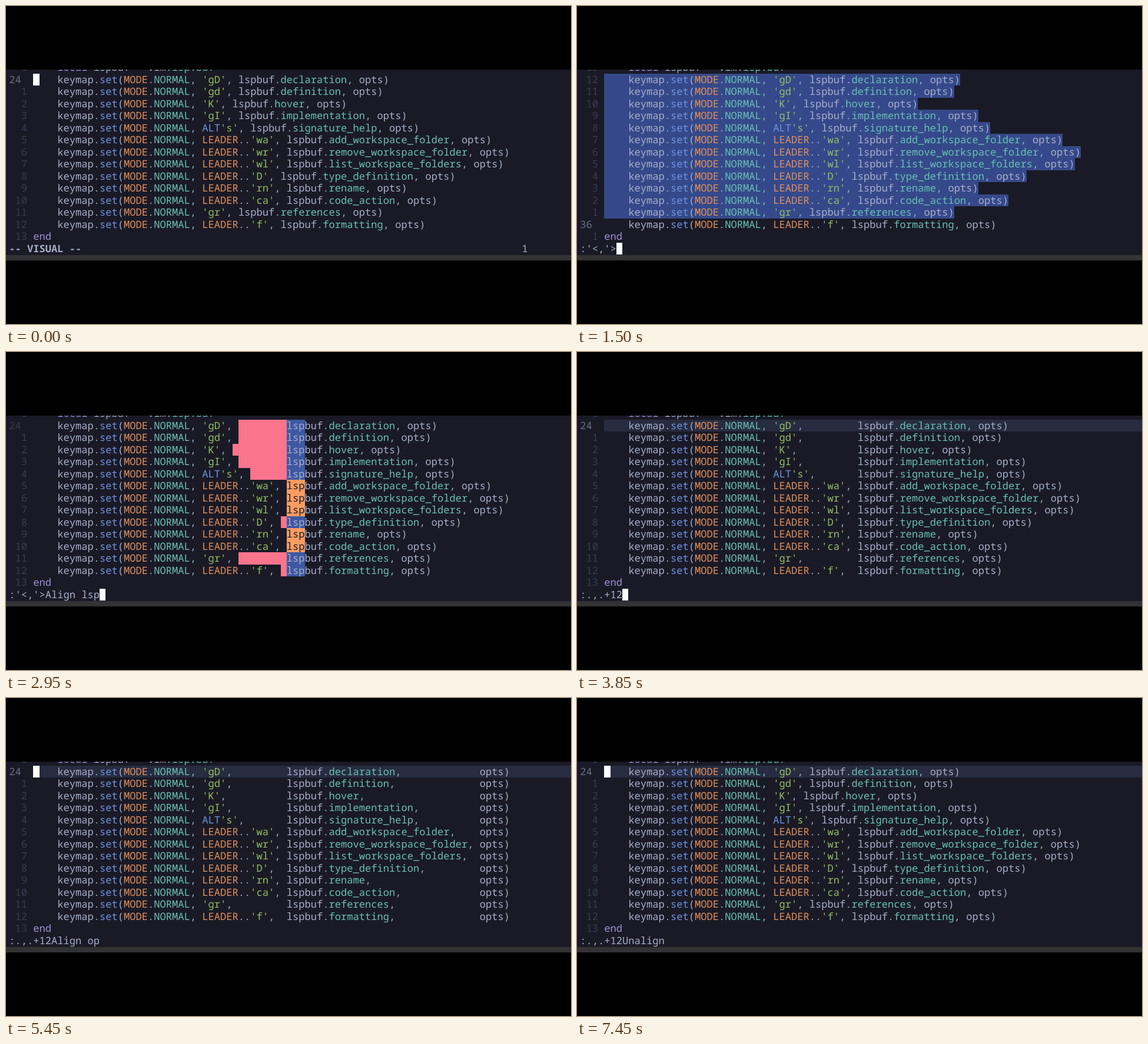
Animation of 960 by 540 pixels, one loop 7500 ms. Source, as an HTML page with a canvas:

```html
<!DOCTYPE html>
<html lang="en">
<head>
<meta charset="utf-8">
<title>Align preview</title>
<style>
  html, body { margin: 0; width: 100%; height: 100%; overflow: hidden; background: #000; }
  canvas { display: block; }
</style>
</head>
<body>
<canvas id="stage" width="960" height="540"></canvas>
<script>
const ctx = document.getElementById('stage').getContext('2d');
const LOOP = 7500;
const CELL = 10.25, ROW = 20.5, LEFT = 5.3, TOP = 114.8, GUTTER = 4, CMD_ROW = 14;
const FONT = '17.083px "Noto Sans Mono", "DejaVu Sans Mono", monospace';

const C = {
  bg: '#1a1a26', side: '#191430', bar: '#333335', line: '#272c40',
  select: '#35498a', search: '#3e59a3', pad: '#fa748c', same: '#fd9c62',
  fg: '#a8aeca', dim: '#3a3c50', number: '#6b6f88', cursor: '#fcfcfd',
  orange: '#e0905d', teal: '#69c1b4', blue: '#7094df', green: '#94bf64',
  purple: '#a18fd8', punct: '#8fb2c4'
};

const rules = [
  [/'[^']*'/y, C.green],
  [/(?:MODE|LEADER)\b/y, C.orange],
  [/NORMAL\b/y, C.teal],
  [/(?:set|ALT)\b/y, C.blue],
  [/(?:local|end)\b/y, C.purple],
  [/(?<=(?:lspbuf|vim)\.)[\w.]+/y, C.teal],
  [/[.,=]+/y, C.punct],
  [/\w+|[()]/y, C.fg]
];

const maps = [
  ["'gD'", 'declaration'], ["'gd'", 'definition'], ["'K'", 'hover'],
  ["'gI'", 'implementation'], ["ALT's'", 'signature_help'],
  ["LEADER..'wa'", 'add_workspace_folder'],
  ["LEADER..'wr'", 'remove_workspace_folder'],
  ["LEADER..'wl'", 'list_workspace_folders'],
  ["LEADER..'D'", 'type_definition'], ["LEADER..'rn'", 'rename'],
  ["LEADER..'ca'", 'code_action'], ["'gr'", 'references'],
  ["LEADER..'f'", 'formatting']
].map(([key, fn]) => `    keymap.set(MODE.NORMAL, ${key}, lspbuf.${fn}, opts)`);

// Pads every row so that the first match starts in one shared column.
function align(rows, pattern) {
  const starts = rows.map(r => r.indexOf(pattern));
  const col = Math.max(...starts);
  return {
    col, starts,
    rows: rows.map((r, i) => r.slice(0, starts[i]).padEnd(col) + r.slice(starts[i]))
  };
}

const first = align(maps, 'lsp').rows;
const buffers = [maps, first, align(first, 'op').rows];

// Each step changes part of the editor state.
const steps = [];
const at = (t, change) => steps.push([t, change]);
function type(start, gap, before, text) {
  [...text].forEach((_, i) => at(start + i * gap, { cmd: before + text.slice(0, i + 1) }));
}

at(0, { cmd: '-- VISUAL --', bold: true, count: '1', cur: 0, mode: 'buffer',
        sel: false, line: false, live: true, buf: 0, pattern: '' });
at(100, { count: '12' });
at(300, { count: '', sel: true, cur: 12 });
at(1300, { cmd: ":'<,'>", bold: false, mode: 'cmd' });
type(1600, 100, ":'<,'>", 'Align ');
at(2000, { sel: false, cur: 0, live: false });
at(2500, { cmd: ":'<,'>Align l", pattern: 'l' });
at(2650, { cmd: ":'<,'>Align ls", pattern: 'ls' });
at(2800, { cmd: ":'<,'>Align lsp", pattern: 'lsp' });
at(3150, { mode: 'buffer', buf: 1, pattern: '', line: true, live: true });
at(3450, { count: '1' });
at(3550, { count: '13' });
at(3700, { count: '', cmd: ':.,.+12', mode: 'cmd' });
type(3900, 100, ':.,.+12', 'Align ');
at(4300, { line: false, live: false });
at(4550, { cmd: ':.,.+12Align o', pattern: 'o' });
at(4750, { cmd: ':.,.+12Align op', pattern: 'op' });
at(5300, { mode: 'buffer', buf: 2, pattern: '', line: true, live: true });
at(5800, { count: '1' });
at(5900, { count: '13' });
at(6150, { count: '', cmd: ':.,.+12', mode: 'cmd' });
type(6450, 65, ':.,.+12', 'Unalign');
at(6840, { buf: 0, line: false, live: false });
at(7050, { mode: 'buffer', line: true, live: true });
steps.sort((a, b) => a[0] - b[0]);

const px = col => LEFT + col * CELL;
const py = row => TOP + row * ROW;

function box(col, row, width, color) {
  const x = Math.round(px(col)), y = Math.round(py(row));
  ctx.fillStyle = color;
  ctx.fillRect(x, y, Math.round(px(col + width)) - x, Math.round(py(row + 1)) - y);
}

function text(str, col, row, color, weight = '') {
  ctx.font = `${weight} ${FONT}`;
  ctx.fillStyle = color;
  ctx.fillText(str, px(col), py(row) + 16);
}

function code(str, row) {
  let i = 0;
  while (i < str.length) {
    let size = 1;
    for (const [re, color] of rules) {
      re.lastIndex = i;
      const hit = re.exec(str);
      if (!hit) continue;
      text(hit[0], GUTTER + i, row, color);
      size = hit[0].length;
      break;
    }
    i += size;
  }
}

function gutter(row, s) {
  const gap = Math.abs(row - s.cur);
  if (gap) text(String(gap).padStart(3), 0, row, C.dim);
  else text(String(24 + row), 0, row, s.live ? C.number : C.dim);
}

function draw(s) {
  ctx.fillStyle = '#000';
  ctx.fillRect(0, 0, 960, 540);
  ctx.save();
  ctx.beginPath();
  ctx.rect(0, 108, 960, 324);
  ctx.clip();
  ctx.fillStyle = C.bg;
  ctx.fillRect(0, 108, 960, 324);
  ctx.fillStyle = C.side;
  ctx.fillRect(0, 108, 4, 314);

  const preview = s.pattern && align(buffers[s.buf], s.pattern);
  const rows = preview ? preview.rows : buffers[s.buf];
  if (s.line) box(GUTTER, s.cur, 90, C.line);

  code('    local lspbuf = vim.lsp.buf', -1);
  code('end', 13);
  for (let i = -1; i < 14; i++) gutter(i, s);

  rows.forEach((r, i) => {
    if (s.sel && i < s.cur) box(GUTTER, i, r.length, C.select);
    code(r, i);
    if (!preview) return;
    const gap = preview.col - preview.starts[i], col = GUTTER + preview.col;
    if (gap) box(col - gap, i, gap, C.pad);
    box(col, i, s.pattern.length, gap ? C.search : C.same);
    text(s.pattern, col, i, gap ? C.fg : C.bg);
  });

  text(s.cmd, 0, CMD_ROW, C.fg, s.bold ? 'bold' : '');
  text(s.count, 85, CMD_ROW, C.fg);
  if (s.mode === 'cmd') box(s.cmd.length, CMD_ROW, 1, C.cursor);
  else {
    box(GUTTER, s.cur, 1, C.cursor);
  }

  ctx.fillStyle = C.bar;
  ctx.fillRect(0, 423, 960, 9);
  ctx.restore();
}

ctx.textBaseline = 'alphabetic';
ctx.textRendering = 'geometricPrecision';
let shown = -1;

function frame(now) {
  const t = now % LOOP;
  const count = steps.filter(([start]) => start <= t).length;
  if (count !== shown) {
    shown = count;
    draw(Object.assign({}, ...steps.slice(0, count).map(step => step[1])));
  }
  requestAnimationFrame(frame);
}

const start = performance.now();
frame(0);
requestAnimationFrame(function tick() {
  frame = now => {
    const t = Math.max(0, now - start) % LOOP;
    const count = steps.filter(([from]) => from <= t).length;
    if (count !== shown) {
      shown = count;
      draw(Object.assign({}, ...steps.slice(0, count).map(step => step[1])));
    }
    requestAnimationFrame(frame);
  };
});
</script>
</body>
</html>
```
